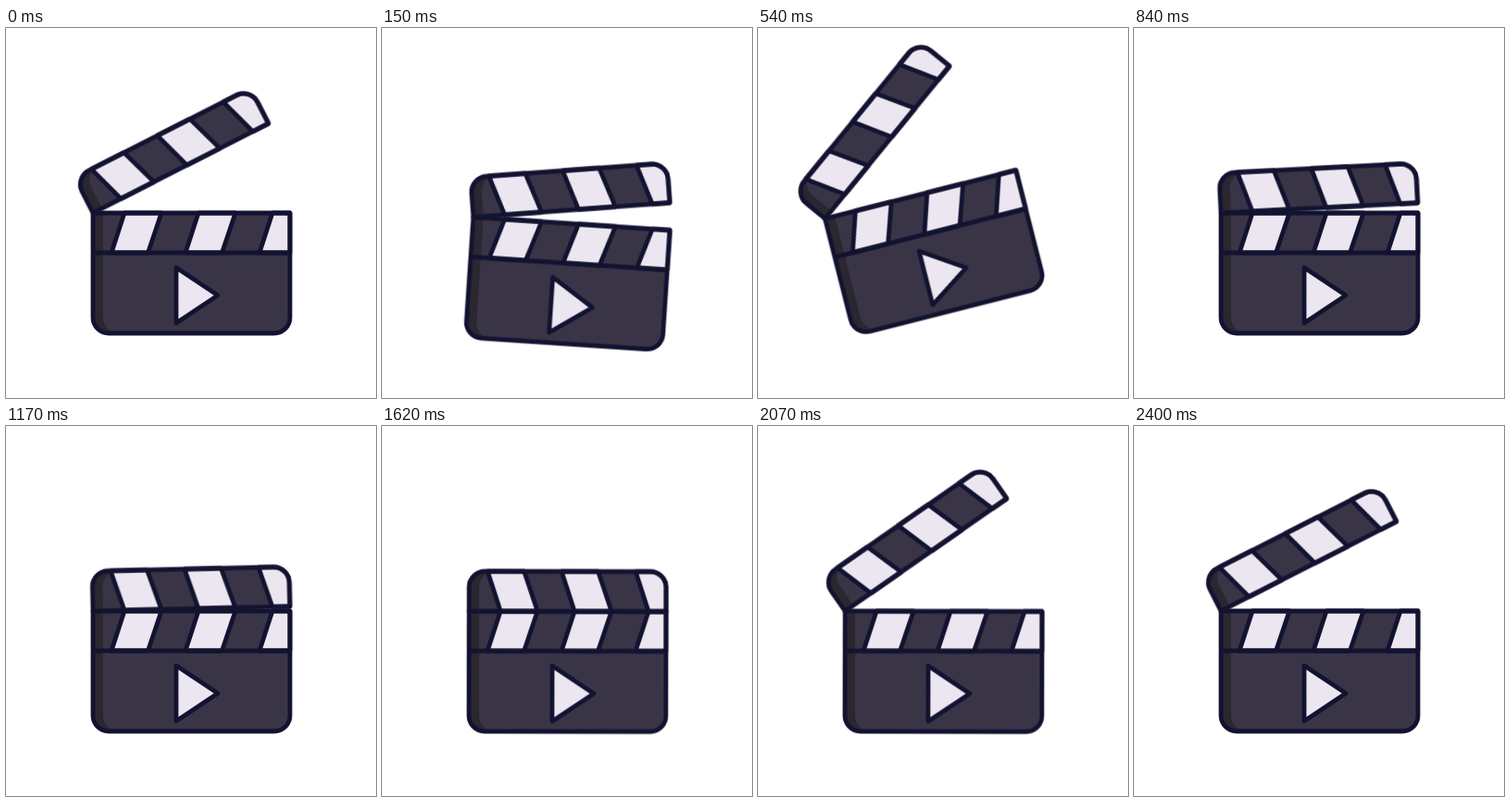
Animation of 400x400 px, one loop 4.46 s. Source, as an HTML page:

```html
<!DOCTYPE html>
<html lang="en">
<head>
<meta charset="utf-8">
<title>Clapperboard</title>
<style>
  html, body {
    margin: 0;
    width: 100%;
    height: 100%;
    overflow: hidden;
    background: #fff;
  }
  svg { display: block; width: 100%; height: 100%; }

  .body { fill: #393546; }
  .shade { fill: #2a2730; }
  .light { fill: #ebe6ef; }
  .line {
    stroke: #121331;
    stroke-width: 4.8;
    stroke-linecap: round;
    stroke-linejoin: round;
  }
  .outline { fill: none; }

  #board {
    transform-origin: 200.5px 265px;
    animation: board 4460ms infinite;
  }
  #arm {
    transform-origin: 94px 200px;
    animation: arm 4460ms infinite;
  }

  /* Dip, lean back, slam flat; later a second dip before reopening */
  @keyframes board {
    0% { transform: translate(0, 0) rotate(0deg); animation-timing-function: ease-in-out; }
    3.363% { transform: translate(.2px, 11.4px) rotate(3.8deg); animation-timing-function: cubic-bezier(.4, 0, .7, .8); }
    6.726% { transform: translate(-6.2px, -9.1px) rotate(-7.8deg); animation-timing-function: cubic-bezier(.33, .67, .67, 1); }
    13.453% { transform: translate(-9px, -22.6px) rotate(-14.5deg); animation-timing-function: cubic-bezier(.5, 0, .8, .7); }
    18.834%, 35.65% { transform: translate(0, 0) rotate(0deg); animation-timing-function: ease-in-out; }
    41.704% { transform: translate(.2px, 11.4px) rotate(3.8deg); animation-timing-function: ease-in-out; }
    47.085%, 100% { transform: translate(0, 0) rotate(0deg); }
  }

  /* Swing open, clap, small bounce, then reopen with overshoot */
  @keyframes arm {
    0% { transform: rotate(-27deg); animation-timing-function: ease-in-out; }
    3.363% { transform: rotate(-8deg); animation-timing-function: cubic-bezier(.4, 0, .7, .7); }
    6.726% { transform: rotate(-19deg); animation-timing-function: cubic-bezier(.4, .4, .7, 1); }
    13.453% { transform: rotate(-38deg); animation-timing-function: cubic-bezier(.5, 0, .6, .9); }
    18.834% { transform: rotate(-3deg); animation-timing-function: linear; }
    20.179% { transform: rotate(0deg); animation-timing-function: ease-in-out; }
    24.888% { transform: rotate(-1.6deg); animation-timing-function: ease-in-out; }
    29.596%, 41.704% { transform: rotate(0deg); animation-timing-function: ease-in-out; }
    47.085% { transform: rotate(-36deg); animation-timing-function: ease-in-out; }
    53.812%, 100% { transform: rotate(-27deg); }
  }
</style>
</head>
<body>
<svg viewBox="0 0 400 400">
  <g id="board">
    <path class="body" d="M94 200H307V313a17 17 0 0 1 -17 17H111a17 17 0 0 1 -17 -17Z"/>
    <path class="shade" d="M94 200H105V313a17 17 0 0 0 17 17H111a17 17 0 0 1 -17 -17Z"/>
    <g class="light line">
      <path d="M128 200H168L153.500 243H114Z"/>
      <path d="M208 200H248L233.500 243H194Z"/>
      <path d="M288 200H307V243H274Z"/>
      <path d="M184 259V319L229 289Z"/>
    </g>
    <path class="outline line" d="M94 200H307V313a17 17 0 0 1 -17 17H111a17 17 0 0 1 -17 -17ZM94 243H307"/>

    <g id="arm">
      <path class="body" d="M94 200V174a17 17 0 0 1 17 -17H290a17 17 0 0 1 17 17V200Z"/>
      <path class="shade" d="M94 200V174a17 17 0 0 1 17 -17H122a17 17 0 0 0 -17 17V200Z"/>
      <g class="light line">
        <path d="M114 157H153.500L168 200H128Z"/>
        <path d="M194 157H233.500L248 200H208Z"/>
        <path d="M274 157H290a17 17 0 0 1 17 17V200H288Z"/>
      </g>
      <path class="outline line" d="M94 200V174a17 17 0 0 1 17 -17H290a17 17 0 0 1 17 17V200Z"/>
    </g>
  </g>
</svg>
</body>
</html>
```
